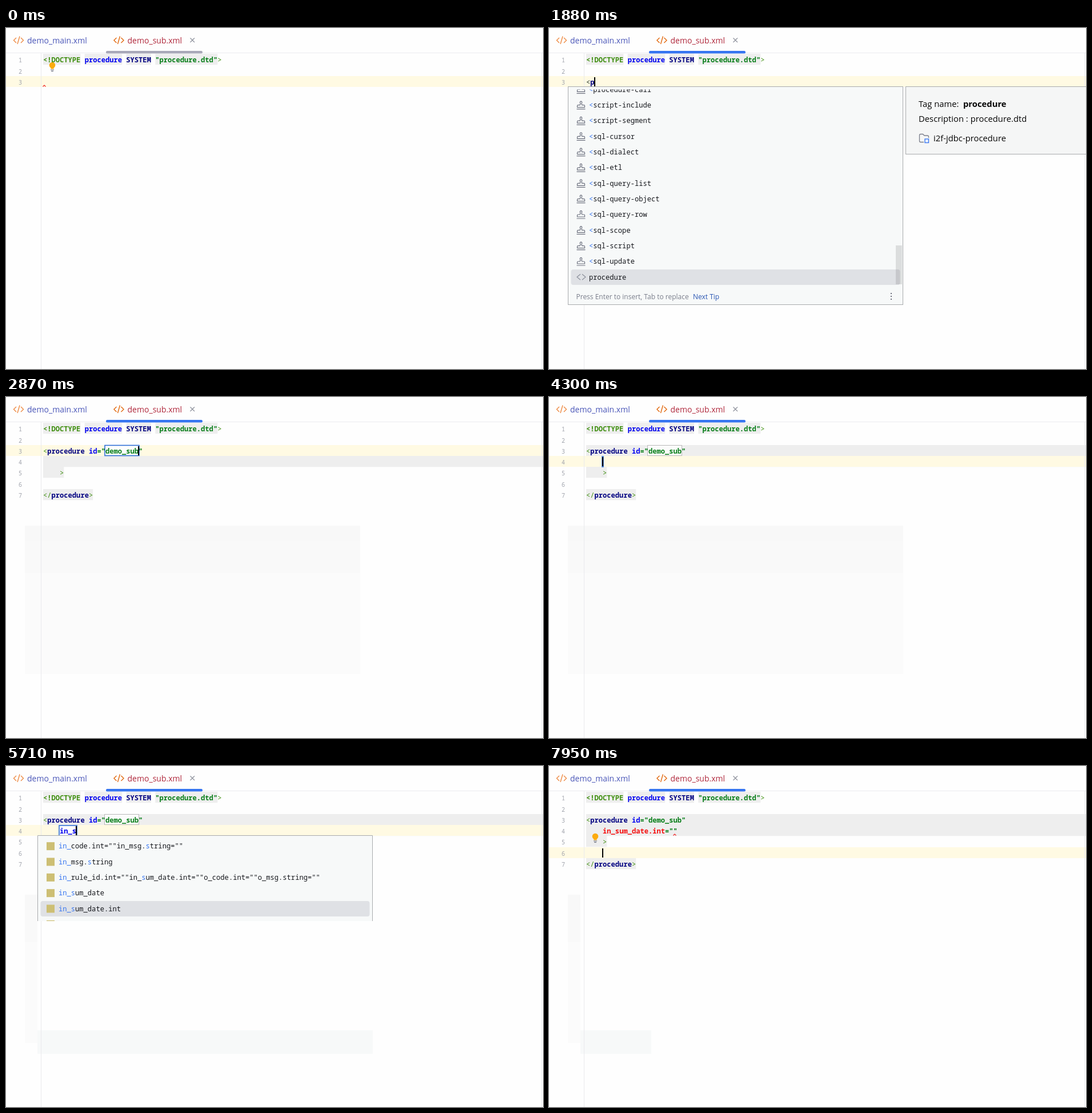
These frames come from a looping animation (940 by 596 pixels, 8 s). An HTML page:

```html
<!DOCTYPE html>
<html lang="en">
<head>
<meta charset="utf-8">
<title>XML completion</title>
<style>
html, body { margin: 0; width: 100%; height: 100%; overflow: hidden; background: #fefefe; }
svg { display: block; }
text { white-space: pre; }
.code { font: 12.12px "Noto Sans Mono", monospace; }
.num { font: 10px "Noto Sans Mono", monospace; fill: #a0a3ac; text-anchor: middle; }
.tab { font: 14px "Open Sans", sans-serif; }
.doc { font: 14.8px "Open Sans", sans-serif; fill: #080808; }
.tip { font: 12px "Open Sans", sans-serif; }
.bold { font-weight: 700; }
</style>
</head>
<body>
<svg id="stage" width="940" height="596" viewBox="0 0 940 596"></svg>
<script>
const LOOP = 8000, CHAR = 7.27, LEFT = 65, ROW = 27.33;
const GREEN = '#3f8f10', NAVY = '#000080', BLUE = '#0000f0', STRING = '#067d17', MATCH = '#3574f0', TAG_BG = '#eeeeee';

const TAGS = ['<procedure-call', '<script-include', '<script-segment', '<sql-cursor', '<sql-dialect',
  '<sql-etl', '<sql-query-list', '<sql-query-object', '<sql-query-row', '<sql-scope', '<sql-script',
  '<sql-update', 'procedure'];
const PROC = ['<procedure', '<procedure-call', 'procedure'];
const PROC_MORE = ['<procedure', '<procedure-call', '<procedure-property', 'procedure'];
const PROC_ALL = ['<procedure', '<procedure-call', '<procedure-property', '<print-line', '<print-debug', 'procedure'];
const RULE = 'in_rule_id.int=""in_sum_date.int=""o_code.int=""o_msg.string=""';
const SUM = ['in_sum_date', 'in_sum_date.int', 'in_sum_date.int=""o_msg.string=""'];
const PARAMS = ['in_code.int=""in_msg.string=""', 'in_msg.string', RULE, ...SUM];
const ALL_PARAMS = ['in_code', 'in_code.int', 'in_code.int=""in_msg.string=""', 'in_msg', 'in_msg.string',
  'in_rule_id', 'in_rule_id.int', RULE, ...SUM, 'int', 'id'];

// Timelines: [start in ms, value]
const TAG_TYPED = [[0, ''], [1390, '<'], [1820, '<p'], [2000, '<pr'], [2060, '<pro'], [2140, '<proc'], [2490, '<proce']];
const PARAM_TYPED = [[0, ''], [4960, 'i'], [5450, 'in'], [5570, 'in_'], [5690, 'in_s'], [5730, 'in_su'],
  [6470, 'in_sum_date.int=""']];
const CARET_ON = [[0, 0], [1000, 1], [2490, 0], [2870, 1], [3220, 0], [3470, 1], [3720, 0], [3970, 1],
  [4690, 0], [4960, 1], [6210, 0], [6430, 1]];
const tagPopup = (bottom, rows, sel, query) => ({ x: 33, top: 102, bottom, rows, sel, query, tags: true });
const paramPopup = (bottom, rows, sel, query, extra) => ({ x: 55, top: 121, bottom, rows, sel, query, ...extra });
const POPUP = [
  [0, null],
  [1510, { ...tagPopup(484, TAGS, 12, ''), toEnd: true }],
  [2000, tagPopup(306.5, PROC_ALL, 5, 'pr')],
  [2080, tagPopup(252, PROC_MORE, 3, 'pro')],
  [2160, tagPopup(252, PROC_MORE, 3, 'proc')],
  [2490, tagPopup(224.5, PROC, 2, 'proce')],
  [2610, tagPopup(224.5, PROC, 1, 'proce')],
  [2710, tagPopup(224.5, PROC, 0, 'proce')],
  [2870, null],
  [5060, paramPopup(503, ALL_PARAMS, 0, 'i')],
  [5470, paramPopup(503, ALL_PARAMS, 0, 'in')],
  [5590, paramPopup(503, ALL_PARAMS, 9, 'in_')],
  [5690, paramPopup(271, PARAMS, 4, 'in_s', { open: true })],
  [5730, paramPopup(271, [RULE, ...SUM], 2, 'in_su')],
  [6450, null],
  [7250, { ...paramPopup(503, ALL_PARAMS, 0, ''), x: 178 }],
  [7410, null],
];

const at = (table, t) => table.reduce((value, [start, next]) => t >= start ? next : value, null);
const esc = s => s.replace(/&/g, '&amp;').replace(/</g, '&lt;');
const lineTop = n => Math.round(45.2 + 19.3 * (n - 1));
const colX = col => LEFT + col * CHAR;

const rect = (x, y, w, h, fill, more = '') => `<rect x="${x}" y="${y}" width="${w}" height="${h}" fill="${fill}" ${more}/>`;
const frame = (x, y, w, h, stroke, fill = 'none', width = 1) => rect(x, y, w, h, fill, `stroke="${stroke}" stroke-width="${width}"`);
const activeFrame = (x, y, w) => frame(x, y, w, 18, '#2f6fd6', '#fdfdfd', 1.6);
const path = (d, stroke, width = 1.3, fill = 'none') => `<path d="${d}" fill="${fill}" stroke="${stroke}" stroke-width="${width}"/>`;
const text = (x, y, cls, s, fill) => `<text x="${x}" y="${y}" class="${cls}"${fill ? ` fill="${fill}"` : ''}>${esc(s)}</text>`;
const spans = (x, y, runs) => `<text x="${x}" y="${y}" class="code">` +
  runs.map(([s, fill, cls = '']) => `<tspan fill="${fill}" class="${cls}">${esc(s)}</tspan>`).join('') + '</text>';
const code = (line, col, ...runs) => spans(colX(col), lineTop(line) + 15, runs);
const tagBg = (line, col, chars) => rect(colX(col), lineTop(line), chars ? chars * CHAR : 875, 19.3, TAG_BG);
const squiggle = (x, y) => path(`M${x} ${y}l2.5-2.5 2.5 2.5`, '#f02020', 1.1);

function bulb(x, y) {
  return `<circle cx="${x}" cy="${y - 1}" r="5.3" fill="#fcab0e"/>` + rect(x - 2.6, y + 2, 5.2, 3.5, '#fcab0e') +
    path(`M${x - 3} ${y + 7}h6M${x - 2} ${y + 9.3}h4`, '#6c707e', 1.2);
}

function tab(x, label, fill, icon) {
  return path(`M${x + 5} 17l-4.5 4.5 4.5 4.5M${x + 13} 17l4.5 4.5-4.5 4.5M${x + 11} 14.5l-4 13.5`, icon, 1.4) +
    text(x + 24, 27, 'tab', label, fill);
}

function chrome(focused) {
  return rect(0, 43, 940, 1, '#ebecf0') +
    tab(13, 'demo_main.xml', '#4a56b8', '#ee8a43') + tab(188.5, 'demo_sub.xml', '#b0283c', '#e2690f') +
    path('M322.5 17.5l7.5 7.5M330 17.5l-7.5 7.5', '#8a8e99', 1.1) +
    rect(175, 40, 169, 4.6, focused ? '#3574f0' : '#a8a8b8', 'rx="2.2"');
}

// Faint blocks left behind by the shrinking popups
function residue(t) {
  const w = t < 5060 ? 587 : 22;
  let out = '';
  if (t >= 2000) out += rect(33, 308, w, 176, '#fbfbfb');
  if (t >= 2080) out += rect(33, 252, w, 56, '#f9f9f9');
  if (t >= 2490) out += rect(33, 225, w, 27, '#f8f8f8');
  if (t >= 5690) out += rect(55, 462, t < 7250 ? 587 : 124, 41, '#f7f9f9');
  return out;
}

function matchRuns(s, query) {
  const q = s[0] === '<' ? '<' + query : query;
  let n = 0;
  while (n < q.length && s[n] === q[n]) n++;
  const tail = q.slice(n);
  const k = tail ? s.search(new RegExp('(?<=[._])' + tail)) : -1;
  const runs = [[s.slice(0, n), MATCH]];
  if (k < 0) return [...runs, [s.slice(n), '#16181d']];
  return [...runs, [s.slice(n, k), '#16181d'], [tail, MATCH], [s.slice(k + tail.length), '#16181d']];
}

function rowIcon(x, y, s, tags) {
  if (!tags) return rect(x + 16, y - 7, 14, 14, '#cdbf74');
  if (s[0] !== '<') return path(`M${x + 22} ${y - 5}l-6 5 6 5M${x + 25} ${y - 5}l6 5-6 5`, '#8c909c', 1.2);
  return path(`M${x + 15.5} ${y + 7}h15M${x + 16.5} ${y + 4}v-2.5q0-1.5 1.5-1.5h3.2l.8-2.5` +
    'c-3-5.5 5-5.5 2 0l.8 2.5h3.2q1.5 0 1.5 1.5v2.5z', '#6c707e', 1.2);
}

function popup({ x, top, bottom, rows, sel, query, tags, toEnd, open }) {
  const listTop = top + 5.5, area = bottom - listTop - (open ? 0 : 35);
  const scroll = toEnd ? rows.length * ROW - area : 0;
  let list = '';
  rows.forEach((s, i) => {
    const y = i * ROW - scroll, mid = y + ROW / 2;
    if (i === sel) list += rect(x + 5.5, Math.round(listTop + y) - listTop, 576, 27, '#dfe1e5', 'rx="4"');
    list += rowIcon(x, mid, s, tags) + spans(x + 37, mid + 4.2, matchRuns(s, query));
  });
  let out = rect(x, top, 587, bottom - top, '#f7f9f9') +
    `<svg x="0" y="${listTop}" width="${x + 586}" height="${area}">${list}</svg>`;
  if (toEnd) out += rect(x + 574, 380, 11, 68, '#000', 'opacity=".11"');
  if (open) return out + path(`M${x + .5} ${bottom}V${top + .5}h586V${bottom}`, '#a9abad', 1);
  const y = bottom - 15;
  return out + text(x + 14.5, y + 4.5, 'tip', 'Press Enter to insert, Tab to replace', '#7b7f8c') +
    text(x + 219, y + 4.5, 'tip', 'Next Tip', '#2b57b3') +
    [-5, 0, 5].map(d => rect(x + 565, y + d - 1, 2, 2, '#6c707e')).join('') +
    frame(x + .5, top + .5, 586, Math.floor(bottom - top) - 1, '#a9abad');
}

function docPanel() {
  return frame(624.5, 102.5, 330, 118, '#a9abad', '#f5f6f6') +
    text(647, 138, 'doc', 'Tag name:') + text(725, 138, 'doc bold', 'procedure') +
    text(647, 163.5, 'doc', 'Description : procedure.dtd') + text(673, 197.5, 'doc', 'i2f-jdbc-procedure') +
    path('M656 199.5h-5.5q-2 0-2-2v-10q0-2 2-2h4l2.5 2.5h5.5q2 0 2 2v2', '#7a7e8a') +
    frame(658, 194, 6.5, 6.5, '#3574f0', '#e7effd', 1.3);
}

function pointer(t) {
  if (t < 160 || t >= 1390) return '';
  const p = Math.min(1, (t - 160) / 800), e = p * p * (3 - 2 * p);
  const x = 398 - 273 * e, y = 592 - 492 * e;
  return path(`M${x - 3.5} ${y - 7.5}h7M${x} ${y - 7.5}v15M${x - 3.5} ${y + 7.5}h7`, '#222', 1);
}

function editor(t) {
  const expanded = t >= 2870, done = t >= 7680;
  const line = done ? 6 : t >= 4240 ? 4 : 3;
  const tag = at(TAG_TYPED, t), param = at(PARAM_TYPED, t);
  const filled = param.endsWith('"');
  let out = tagBg(1, 0, 9) + tagBg(1, 10, 9) + tagBg(1, 20, 6) + tagBg(1, 27, 15);
  if (expanded) out += tagBg(3, 0) + tagBg(4, 0) + tagBg(5, 0, 5) + tagBg(7, 0, 12);
  out += rect(0, lineTop(line), 940, 19, '#fffae3') +
    rect(61, 44, 1, 552, '#e9eaed') + rect(937, 44, 1, 552, '#ebecf0');
  for (let n = 1; n <= (expanded ? 7 : 3); n++) out += text(25, lineTop(n) + 15, 'num', String(n));
  out += code(1, 0, ['<!DOCTYPE ', GREEN, 'bold'], ['procedure', BLUE, 'bold'], [' SYSTEM ', NAVY, 'bold'],
    ['"procedure.dtd"', STRING, 'bold'], ['>', GREEN]);

  let col;
  if (!expanded) {
    col = tag.length;
    out += code(3, 0, [tag.slice(0, 1), '#2c3a2c'], [tag.slice(1), NAVY, 'bold']);
    if (t < 1390) out += squiggle(64.5, 102.5) + bulb(81, 66);
  } else {
    if (line === 3) out += activeFrame(173, 84.5, 60);
    if (line === 4) {
      out += frame(172.5, 84.5, 60, 18, '#b9b9b9', '#fbfbfb') + activeFrame(93, 104, param.length * CHAR + 2);
    }
    out += code(3, 0, ['<', GREEN], ['procedure', NAVY, 'bold'], [' id', BLUE, 'bold'], ['="demo_sub"', STRING, 'bold']);
    const name = filled ? param.slice(0, -3) : param;
    out += code(4, 4, [name, done ? '#f51010' : BLUE, 'bold'], [param.slice(name.length), STRING, 'bold']) +
      code(5, 4, ['>', GREEN]) + code(7, 0, ['</', GREEN], ['procedure', NAVY, 'bold'], ['>', GREEN]);
    if (done) out += squiggle(217.5, 121.5);
    if (t >= 7950) out += bulb(81, 124);
    col = line === 3 ? 23 : line === 6 ? 4 : 4 + param.length - (filled ? 1 : 0);
  }
  if (at(CARET_ON, t)) out += rect(Math.round(colX(col)) - 1, lineTop(line) + 2, 2, 16, '#000');
  return out;
}

function scene(t) {
  const list = at(POPUP, t);
  return rect(0, 0, 940, 596, '#fefefe') + residue(t) + chrome(t >= 980) + editor(t) +
    (list ? popup(list) : '') + (t >= 1820 && t < 2650 ? docPanel() : '') + pointer(t);
}

const stage = document.getElementById('stage');
const start = performance.now();
let shown = '';
function tick() {
  const next = scene((performance.now() - start) % LOOP);
  if (next !== shown) stage.innerHTML = shown = next;
  requestAnimationFrame(tick);
}
tick();
</script>
</body>
</html>
```
